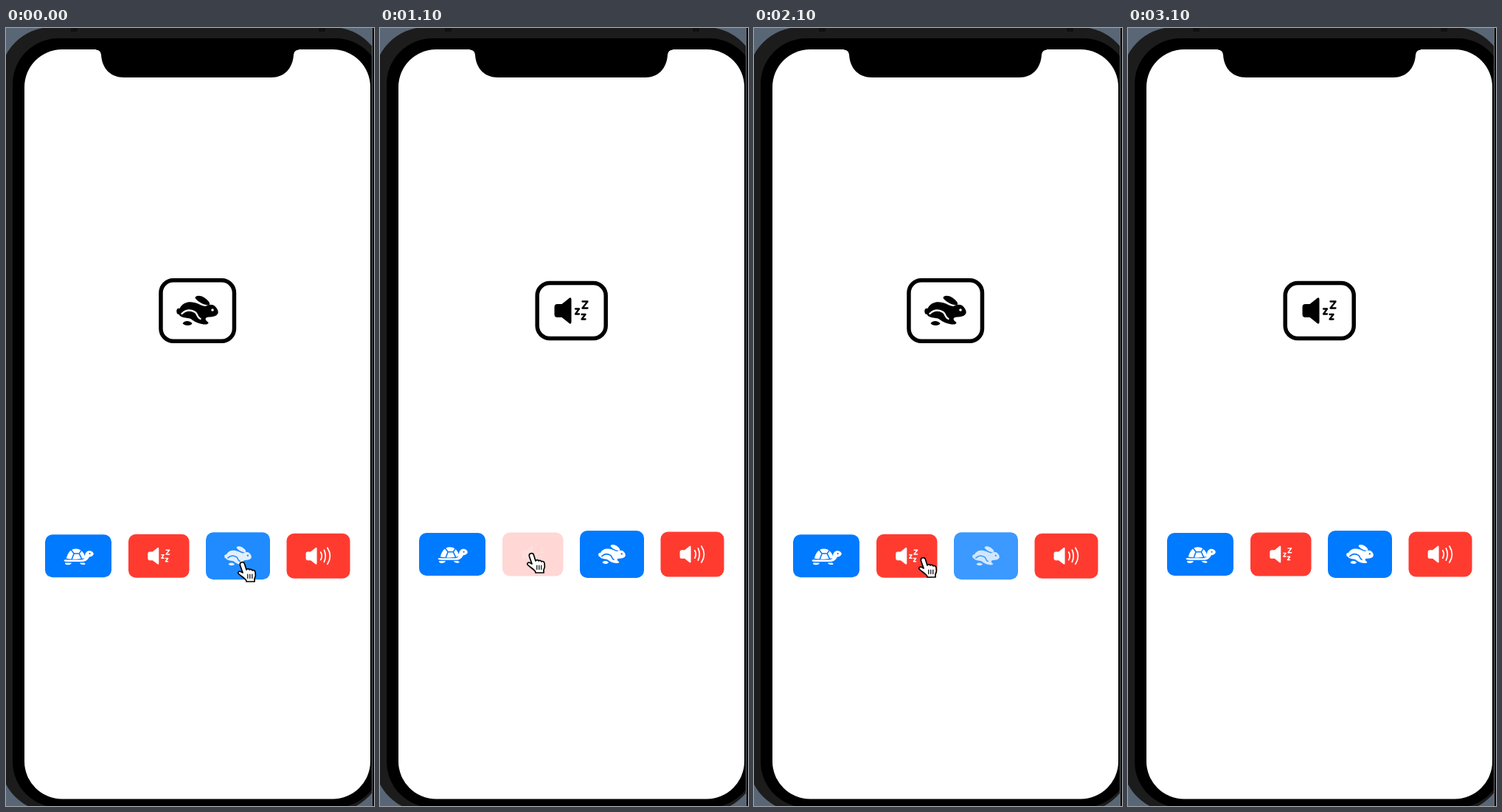
These frames come from a looping animation (499x1054 px, 3700 ms). An HTML page:

```html
<!DOCTYPE html>
<html lang="en">
<head>
<meta charset="utf-8">
<title>Tap to choose an icon</title>
<style>
  html, body { margin: 0; width: 100%; height: 100%; overflow: hidden; background: #596675; }
  svg { display: block; width: 100%; height: 100%; }
  .ink { fill: currentColor; stroke: none; }
  .line { fill: none; stroke: currentColor; stroke-linecap: round; stroke-linejoin: round; }
  .gap { fill: none; stroke: var(--gap); stroke-width: 2.4; stroke-linecap: round; }
  .hole { fill: var(--gap); }
</style>
</head>
<body>
<svg viewBox="0 0 499 1054" preserveAspectRatio="none">
  <defs>
    <g id="turtle">
      <path class="ink" d="M-25 5C-22-6-16-15-5-15C5-15 11-8 15 3C12 7-18 8-25 5Z"/>
      <path class="gap" d="M-15-13L-9-5H2L7-13M-9-5L-14 8M2-5L8 8"/>
      <path class="ink" d="M-30 9C-28 7-26 8-23 8H6C13 8 14 2 14-2C15-7 18-11 23-11C29-11 32-7 32-4C31 0 27 1 23 2C19 10 14 12 8 12H-22C-27 12-30 11-30 9Z"/>
      <path class="ink" d="M-27 14H-14C-15 18-20 19-25 18C-28 17-28 15-27 14ZM3 14H12C16 16 16 18 11 18C7 18 4 17 3 14Z"/>
      <circle class="hole" cx="24" cy="-5" r="1.7"/>
    </g>
    <path id="cone" class="ink" d="M-26-5Q-26-9-22-9H-16L-6-17Q-3-19-3-15V15Q-3 19-6 17L-16 9H-22Q-26 9-26 5Z"/>
    <g id="sleep">
      <use href="#cone" x="3"/>
      <path class="line" stroke-width="2.3" d="M15-12.5H22L15-3.5H22M5.5-2.5H10.5L5.5 4.5H10.5M14 5H19L14 11.5H19"/>
    </g>
    <g id="rabbit">
      <path class="ink" d="M-3-17C-3-21 4-21 9-18C15-14 18-10 16-8C10-7 2-11-3-17Z"/>
      <path class="ink" d="M-28 2C-29-1-27-4-24-3C-20-11-12-13-4-11C2-10 6-6 11-6C15-9 21-9 24-6C28-2 30 3 26 6C22 9 17 8 13 9C9 11 12 14 15 16C15 19 10 19 6 18C0 17-4 15-9 11C-15 9-23 10-25 5C-27 5-28 4-28 2Z"/>
      <path class="gap" d="M-21 4C-15-2-8-1-3 2C1 5-1 9 4 11"/>
      <path class="ink" d="M-20 17C-17 13-11 13-7 17C-8 21-18 21-20 17Z"/>
      <circle class="hole" cx="20.5" cy="-1" r="1.8"/>
    </g>
    <g id="loud">
      <use href="#cone"/>
      <path class="line" stroke-width="2.7" d="M5-8Q9.5 0 5 8M12-12.5Q18 0 12 12.5M19-17Q30 0 19 17"/>
    </g>
  </defs>

  <rect width="499" height="1054" fill="#596675"/>
  <rect x="-8" y="-1" width="520" height="1063" rx="70" fill="#1c1c1c"/>
  <path d="M88 0H97V5H88ZM424 0H433V5H424Z" fill="#111"/>
  <rect x="9" y="14" width="500" height="1042" rx="62"/>
  <rect x="25" y="29" width="469" height="1015.5" rx="51" fill="#fff"/>
  <path d="M122 28V29.5Q128 29.5 129 36C130 55 142 67 160 67H360C377 67 389 55 390 36Q391 29.5 397 29.5V28Z"/>
  <path d="M496.5 0V1054" stroke="#666d75"/>
  <path d="M498 0V1054" stroke="#000" stroke-width="2"/>

  <g id="display" color="#000" style="--gap:#fff">
    <rect id="frame" fill="#fff" stroke="#000" stroke-width="5.5" rx="17"/>
    <use id="picked" x="259.5" y="383"/>
  </g>
  <g id="buttons"></g>
  <circle id="ring" r="46" fill="none" stroke="#000" stroke-width="2"/>
  <g id="hand" stroke-linejoin="round" stroke-linecap="round">
    <path fill="#fff" stroke="#000" stroke-width="1.7" d="M2 0C4-1 6 0 6.5 2L9 10C10 8 12.5 8.5 13 10C14 9 16.5 9 17 11C18 10 20.5 10.5 21 13C22 17 21 20 20 22V26H9L8.5 24C6 21 1 18-2 15C-3 13-1 11.5 1.5 12.5L4 14L.5 4C0 2 0 .5 2 0Z"/>
    <path fill="none" stroke="#000" stroke-width="1.2" d="M10.8 16V21.5M13.8 16V21.5M16.8 16V21.5"/>
  </g>
</svg>
<script>
const LOOP = 3700, STEP = 100;
const BLUE = '#007aff', RED = '#ff3b30';
const $ = id => document.getElementById(id);

// Button box at rest, and the frame box and row shift when its icon is shown
const items = {
  turtle: { x: 53, y: 684, w: 90, h: 58, fill: BLUE },
  sleep: { x: 166, y: 683.5, w: 82.5, h: 59, fill: RED, frame: [98.5, 80.5], shift: 0 },
  rabbit: { x: 271, y: 681, w: 87, h: 64, fill: BLUE, frame: [105, 88], shift: 2.3 },
  loud: { x: 380.5, y: 682.5, w: 86, h: 61, fill: RED, frame: [104, 84], shift: 1.1 }
};

const taps = [
  { name: 'rabbit', down: -400, up: -300 },
  { name: 'loud', down: 400, up: 500 },
  { name: 'sleep', down: 1000, up: 1100 },
  { name: 'sleep', down: 1300, up: 1400 },
  { name: 'rabbit', down: 1700, up: 1900 },
  { name: 'sleep', down: 2200, up: 2225 }
];

// Pointer stops: time, x, y
const stops = [
  [0, 317, 724], [400, 413, 719], [800, 413, 719], [1000, 202, 712],
  [1400, 202, 712], [1700, 322, 718], [1900, 322, 718],
  [2100, 226, 718], [2200, 223, 719]
];
const HAND_END = 2800;

function add(parent, tag, attrs) {
  const el = document.createElementNS('http://www.w3.org/2000/svg', tag);
  set(el, attrs);
  return parent.appendChild(el);
}

function set(el, attrs) {
  for (const key in attrs) el.setAttribute(key, attrs[key]);
}

for (const [name, b] of Object.entries(items)) {
  b.group = add($('buttons'), 'g', { color: '#fff', style: `--gap:${b.fill}` });
  add(b.group, 'rect', { x: b.x, y: b.y, width: b.w, height: b.h, rx: 10, fill: b.fill });
  b.icon = add(b.group, 'use', {
    href: '#' + name,
    transform: `translate(${b.x + b.w / 2} ${b.y + b.h / 2}) scale(.65)`
  });
}

function opacityAt(name, t) {
  const tap = taps.filter(p => p.name === name && p.down <= t).pop();
  if (!tap) return 1;
  if (t < tap.up) return 0.2;
  const a = 1 - 0.8 * Math.exp((tap.up - t) / 165);
  return a > 0.97 ? 1 : a;
}

function pointerAt(t) {
  const i = stops.findIndex(s => s[0] > t);
  if (i < 0) return stops[stops.length - 1].slice(1);
  const [a, b] = [stops[i - 1], stops[i]];
  const p = (t - a[0]) / (b[0] - a[0]);
  const e = p * p * (3 - 2 * p);
  return [1, 2].map(k => a[k] + (b[k] - a[k]) * e);
}

function draw(t) {
  const shown = taps.filter(p => p.up <= t).pop().name;
  const { frame: [w, h], shift } = items[shown];
  set($('frame'), {
    x: 259.7 - w / 2 + 2.75, y: 383 - h / 2 + 2.75,
    width: w - 5.5, height: h - 5.5
  });
  set($('picked'), { href: '#' + shown });
  set($('buttons'), { transform: `translate(0 ${shift})` });

  for (const name in items) {
    const a = opacityAt(name, t);
    set(items[name].group, { opacity: a });
    set(items[name].icon, { opacity: a });
  }

  const [x, y] = pointerAt(t);
  const pressed = taps.some(p => p.down <= t && t < p.up);
  set($('hand'), {
    transform: `translate(${x} ${y})`,
    visibility: t < HAND_END ? 'visible' : 'hidden'
  });
  set($('ring'), { cx: x + 5, cy: y, visibility: pressed ? 'visible' : 'hidden' });
}

const start = performance.now();
function tick() {
  const t = (performance.now() - start) % LOOP;
  draw(Math.floor(t / STEP) * STEP);
  requestAnimationFrame(tick);
}
tick();
</script>
</body>
</html>
```
